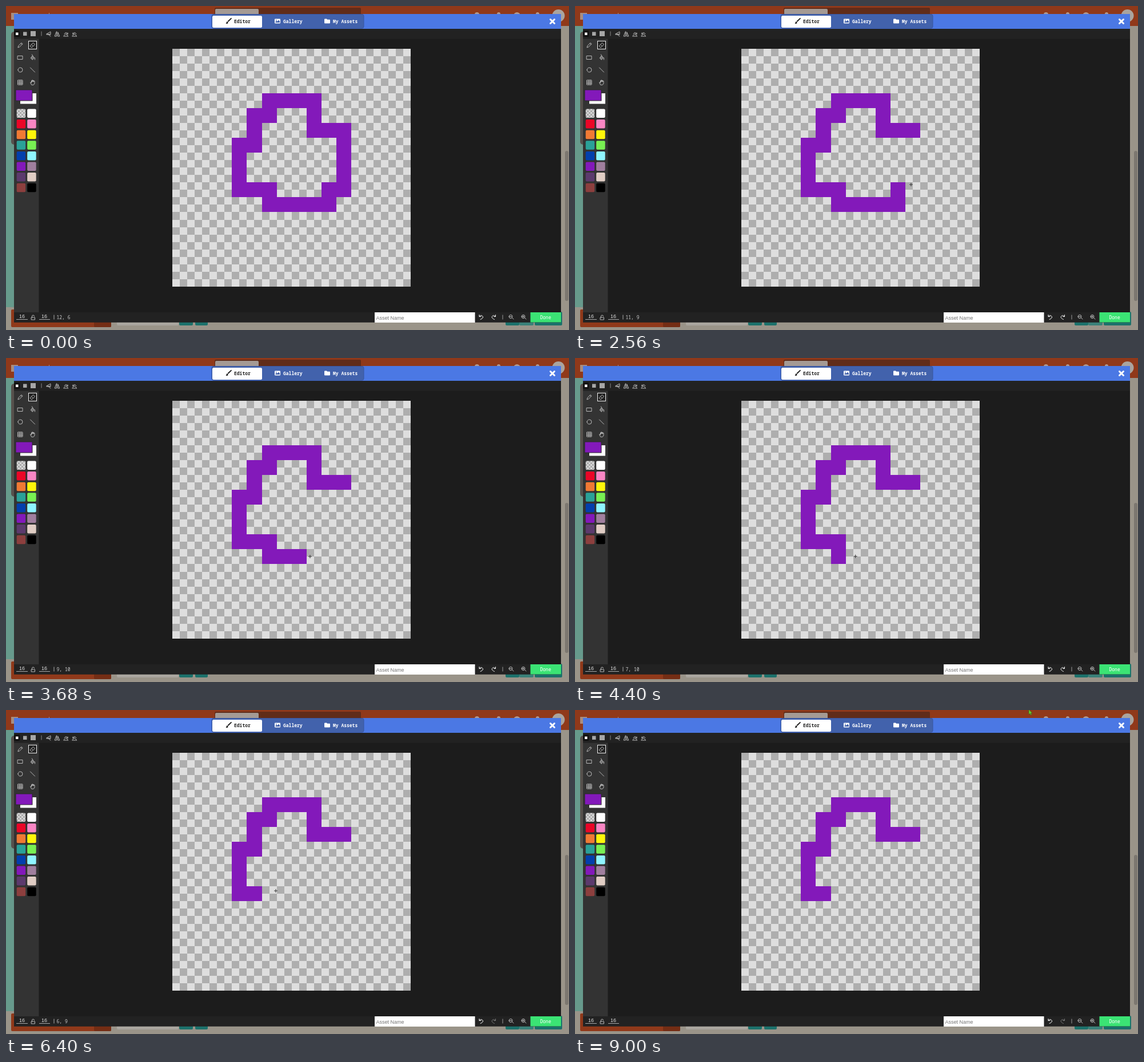
An HTML page that plays this animation: 985 px wide and 568 px high, repeating every 9040 ms.

```html
<!DOCTYPE html>
<html lang="en">
<head>
<meta charset="utf-8">
<title>Pixel editor</title>
<style>
html, body { margin: 0; width: 100%; height: 100%; overflow: hidden; background: #1c1c1c; }
svg { display: block; width: 985px; height: 568px; }
.mono { font: 8px "Noto Sans Mono", "DejaVu Sans Mono", monospace; }
.bold { font-weight: 700; }
.sans { font: 9px "Liberation Sans", Arial, sans-serif; }
.icon { fill: none; stroke: #b9b9b9; stroke-width: 1; stroke-linecap: round; stroke-linejoin: round; }
.crisp { shape-rendering: crispEdges; }
</style>
</head>
<body>
<svg id="stage" viewBox="0 0 985 568" xmlns="http://www.w3.org/2000/svg"></svg>
<script>
const LOOP = 9040, RELEASE = 5700, CROSS_FROM = 200;
const GRID = { x: 291, y: 74.5, size: 417.4, cells: 16 };
const CELL = GRID.size / GRID.cells;
const PURPLE = '#8319ba';

// Filled spans: row, first column, last column
const SPANS = [
  [3, 6, 9], [4, 5, 6], [4, 9, 9], [5, 5, 5], [5, 9, 11], [6, 4, 5], [6, 11, 11],
  [7, 4, 4], [7, 11, 11], [8, 4, 4], [8, 11, 11], [9, 4, 6], [9, 10, 11], [10, 6, 10]
];

// Pointer path: time, x, y
const PATH = [
  [0, 611, 242], [700, 612, 243], [950, 598, 246], [1500, 591, 268], [2560, 588, 313],
  [2900, 566, 326], [3200, 564, 345], [3680, 532, 348], [4250, 500, 348], [4800, 466, 347],
  [5160, 461, 337], [5400, 462, 330], [5900, 468, 322], [6400, 472, 317], [6520, 473, 316],
  [7040, 796, 4]
];

const PALETTE = [
  'url(#clear)', '#fff', '#ea0627', '#f986c4', '#f17a34', '#fff60a', '#2aa198', '#78f053',
  '#033fad', '#8ff5ff', PURPLE, '#a07f9e', '#5c3a6d', '#e0cdc4', '#8c3f3e', '#000'
];

const rect = (x, y, w, h, fill, extra = '') =>
  `<rect x="${x}" y="${y}" width="${w}" height="${h}" fill="${fill}" ${extra}/>`;
const text = (x, y, label, fill, cls, extra = '') =>
  `<text x="${x}" y="${y}" fill="${fill}" class="${cls}" ${extra}>${label}</text>`;
const icon = (x, y, d, extra = '') =>
  `<path class="icon" transform="translate(${x} ${y})" d="${d}" ${extra}/>`;
const circle = (x, y, r, fill) => `<circle cx="${x}" cy="${y}" r="${r}" fill="${fill}"/>`;

function backdrop() {
  return rect(0, 0, 985, 568, '#9a9489') +
    rect(0, 35, 14, 493, '#679a8c') +
    rect(9, 45, 20, 198, '#57514d', 'rx="5"') +
    rect(0, 0, 985, 35, '#90391a') +
    rect(9, 12, 12, 12, '#a98d80') +
    rect(75, 12, 1, 8, '#a98d80') +
    rect(365, 3, 256, 20, '#602c19', 'rx="2"') +
    rect(366, 5, 76, 18, '#a49a94', 'rx="2"') +
    circle(824, 15, 4, '#b29a8f') + circle(862, 14, 3, '#b29a8f') +
    circle(894, 17, 6, '#b29a8f') + circle(930, 14, 3, '#b29a8f') +
    circle(966.5, 17, 11, '#aaa49e') +
    rect(978, 254, 6, 263, '#7c7770', 'rx="3"') +
    rect(9, 532, 175, 31, '#90391a', 'rx="2"') +
    rect(154, 532, 30, 31, '#742d14', 'rx="2"') +
    rect(194, 536, 108, 24, '#aaa69f', 'rx="2"') +
    rect(303, 536, 24, 24, '#1c716b', 'rx="2"') +
    rect(331, 536, 22, 24, '#1c716b', 'rx="2"') +
    rect(874, 536, 24, 24, '#1c716b', 'rx="2"') +
    rect(898, 536, 25, 24, '#3a8079', 'rx="2"') +
    rect(925, 536, 48, 24, '#1c716b', 'rx="2"');
}

function header() {
  return rect(14, 14, 957, 26, '#4b78e4') +
    rect(360, 14.5, 266, 24.5, '#4262ac', 'rx="3" stroke="#3956a0"') +
    rect(361, 17, 87, 21, '#fff', 'rx="2.5"') +
    '<path d="M395 22 389 28 387.500 26.500 393.500 21Q395 20.500 395 22ZM387 27 388.800 29Q388 32 384.500 31Q386 30 385.500 28.500Z" fill="#222"/>' +
    text(399, 30, 'Editor', '#222', 'mono bold') +
    rect(470, 22.5, 10, 8, '#fff', 'rx="1"') +
    '<path d="M471.500 29V27.500L473.500 26 475 27 477 24.500 479 27V29Z" fill="#4262ac"/>' + circle(472.8, 24.8, .9, '#4262ac') +
    text(485, 30, 'Gallery', '#fff', 'mono bold') +
    '<path d="M557 23.500Q557 22.500 558 22.500H561L562.200 23.700H566Q567 23.700 567 24.700V29.500Q567 30.500 566 30.500H558Q557 30.500 557 29.500Z" fill="#fff"/>' +
    text(572, 30, 'My Assets', '#fff', 'mono bold') +
    '<path d="M952.500 23.500 959.500 30.500M959.500 23.500 952.500 30.500" stroke="#fff" stroke-width="3" stroke-linecap="round"/>';
}

function sizeBar() {
  const triangles = 'M-4 0 3-4V0ZM-4 1H3M-1 1 3 4';
  return rect(14, 40, 957, 17.5, '#222') +
    rect(14, 43, 10, 11, '#111') + rect(17, 46.5, 4.5, 4.5, '#fff') +
    rect(30, 45.5, 6.5, 6.5, '#a7a7a7') + rect(43, 44, 9, 9, '#a7a7a7') +
    rect(61.5, 44.5, 1, 8, '#888') +
    icon(75, 49, triangles) +
    icon(89.5, 49, 'M-4 4H-1V-4ZM1-3V4H4Z') +
    icon(105, 50, 'M-4 3H4L0-1ZM-3-1Q0-6 3-1M3-1V-3M3-1H1') +
    icon(120, 50, 'M-4 3H4L0-1ZM3-1Q0-6-3-1M-3-1V-3M-3-1H-1');
}

function sidebar() {
  const swatches = PALETTE.map((fill, i) =>
    rect(18.7 + i % 2 * 18.5, 180.5 + (i >> 1) * 18.6, 15.5, 15.5, fill, 'rx="2"')).join('');
  return rect(14, 57.5, 43.5, 480, '#333') +
    icon(25, 68.5, 'M-4 4-3 1 2-4 4-2-1 3ZM1-3 3-1') +
    rect(39.5, 61.5, 14, 14, '#222', 'stroke="#eee"') +
    icon(46.5, 68.5, 'M-4 1 1-4 4-1-1 4H-2ZM-2-1 1 2') +
    icon(25, 90.5, 'M-4.500-3H4V3H-4.500Z') +
    icon(46.5, 90, 'M-3 1 0-3 3 1 0 4ZM0-3-1-5M4 1V4', 'style="fill:#777"') +
    icon(25, 112, 'M-4 0A4 4 0 1 1 4 0A4 4 0 1 1-4 0Z') +
    icon(46.5, 112, 'M-4-4 4 4') +
    icon(25, 134, 'M-4-4H4V4H-4ZM-4-1H4M-4 1.500H4M-1.300-4V4M1.300-4V4', 'stroke-width=".7"') +
    icon(46.5, 134, 'M-2 4-4 0-3-.500-2 1V-3H-1V-1-4H.500V-1-3.500H2V-1-2.500H3.500V2L2 4Z') +
    rect(25, 153, 28, 18.5, '#fff') +
    rect(17, 147, 29, 19, PURPLE, 'stroke="#2b2b2b"') +
    swatches;
}

function footer() {
  const lens = 'M-4-.500A3 3 0 1 1 2-.500A3 3 0 1 1-4-.500ZM1.500 1.500 4 4M-2.500-.500H.500';
  return rect(14, 537, 957, 17.5, '#222') +
    text(23, 547, '16', '#ddd', 'sans') + rect(18, 549, 20, 1, '#aaa') +
    icon(47.5, 546, 'M-3 0H3V4H-3ZM-2 0V-2A2 2 0 0 1 2-2') +
    text(62, 547, '16', '#ddd', 'sans') + rect(58, 549, 19, 1, '#aaa') +
    rect(83.5, 541.5, 1, 8, '#aaa', 'id="divider"') +
    text(88.5, 548.5, '', '#ccc', 'mono', 'id="coords"') +
    rect(645, 537, 175.5, 18, '#fff') +
    text(647.5, 550, 'Asset Name', '#757575', 'sans') +
    icon(831, 545.5, 'M-3-4V-1H0M-3-1Q0-4.500 2.500-2T1 3L-1 4', 'style="stroke:#fff"') +
    icon(853.5, 545.5, 'M3-4V-1H0M3-1Q0-4.500-2.500-2T-1 3L1 4', 'id="redo"') +
    rect(868.5, 541.5, 1, 8, '#999') +
    icon(884, 545, lens) + icon(906, 545, lens + 'M-1-2V1') +
    rect(917.5, 537, 53.5, 17.5, '#3be374') +
    text(934.5, 548.5, 'Done', '#fff', 'mono');
}

function board() {
  const n = GRID.cells * 2, step = CELL / 2;
  let checks = '';
  for (let y = 0; y < n; y++)
    for (let x = 0; x < n; x++)
      if ((x + y) % 2) checks += `M${GRID.x + x * step} ${GRID.y + y * step}h${step}v${step}h${-step}z`;
  return rect(GRID.x, GRID.y, GRID.size, GRID.size, '#aeaeae', 'class="crisp"') +
    `<path class="crisp" d="${checks}" fill="#dedede"/>` +
    `<path class="crisp" id="drawing" fill="${PURPLE}"/>`;
}

const defs = `<defs><pattern id="clear" width="6" height="6" patternUnits="userSpaceOnUse">
  ${rect(0, 0, 6, 6, '#d8d8d8')}${rect(0, 0, 3, 3, '#aaa')}${rect(3, 3, 3, 3, '#aaa')}</pattern></defs>`;
const pointers = '<path id="cross" d="M-3 0H3M0-3V3" stroke="#333" stroke-width="1"/>' +
  '<path id="arrow" d="M-2-5V4L0 2 1.500 5 3 4 1.500 1.500H4Z" fill="#66cf2e" stroke="#3f5a18" stroke-width=".6"/>';

const byId = id => document.getElementById(id);
byId('stage').innerHTML = defs + backdrop() + rect(14, 40, 957, 514.5, '#1c1c1c') +
  header() + sizeBar() + sidebar() + footer() + board() + pointers;

function pointerAt(t) {
  const next = PATH.findIndex(key => key[0] > t);
  if (next < 0) return PATH[PATH.length - 1].slice(1);
  const [t0, x0, y0] = PATH[next - 1], [t1, x1, y1] = PATH[next];
  const k = (t - t0) / (t1 - t0);
  return [x0 + (x1 - x0) * k, y0 + (y1 - y0) * k];
}

const cellAt = ([x, y]) => [Math.floor((x - GRID.x) / CELL), Math.floor((y - GRID.y) / CELL)];
const onBoard = cell => cell.every(v => v >= 0 && v < GRID.cells);

// First moment the eraser touches each cell
const erasedAt = {};
for (let t = 0; t <= RELEASE; t += 10) erasedAt[cellAt(pointerAt(t))] ??= t;

const pixels = SPANS.flatMap(([row, from, to]) =>
  Array.from({ length: to - from + 1 }, (_, i) => [from + i, row]));

function render(t) {
  const point = pointerAt(t), cell = cellAt(point), inside = onBoard(cell);
  byId('drawing').setAttribute('d', pixels
    .filter(p => !(erasedAt[p] <= t))
    .map(([x, y]) => `M${GRID.x + x * CELL} ${GRID.y + y * CELL}h${CELL}v${CELL}h${-CELL}z`).join(''));
  byId('coords').textContent = inside ? cell.join(', ') : '';
  byId('divider').style.display = inside ? '' : 'none';
  byId('redo').style.stroke = t < RELEASE ? '#eee' : '#777';
  byId('cross').style.display = inside && t >= CROSS_FROM ? '' : 'none';
  byId('arrow').style.display = inside ? 'none' : '';
  for (const id of ['cross', 'arrow']) byId(id).setAttribute('transform', `translate(${point})`);
}

const start = performance.now();
function tick() {
  render((performance.now() - start) % LOOP);
  requestAnimationFrame(tick);
}
tick();
</script>
</body>
</html>
```
